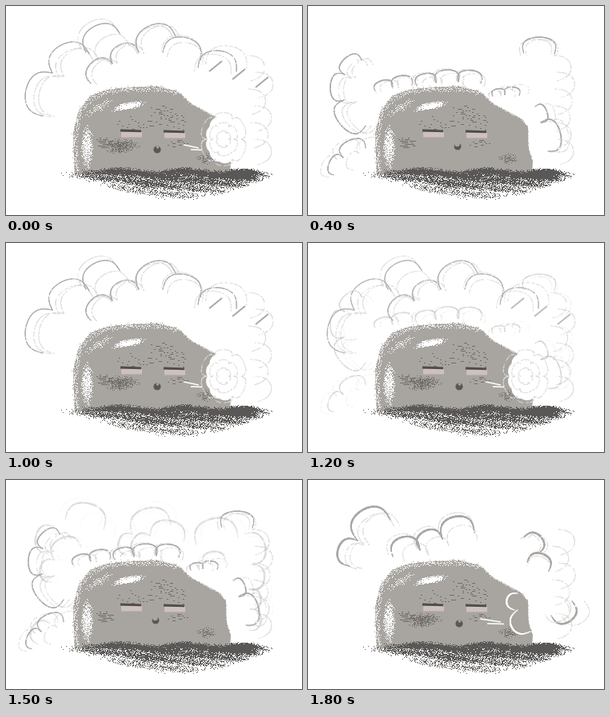
Animation, 370 px wide and 262 px high, one loop 2000 ms. Source, as an HTML page with a canvas:

```html
<!DOCTYPE html>
<html lang="en">
<head>
<meta charset="utf-8">
<title>Puffing rock</title>
<style>
html, body { margin: 0; width: 100%; height: 100%; overflow: hidden; background: #fff; }
canvas { display: block; }
</style>
</head>
<body>
<canvas id="stage" width="370" height="262"></canvas>
<script>
const W = 370, H = 262, LOOP = 1000;
const stage = document.getElementById('stage').getContext('2d');
const ROCK = '#a8a5a0', DARK = '#5a5856', SPECK = '#716e6a', LID = '#4f4c4a', BLUSH = '#cec0bd';
const SMOKE = '#aaa7a4', PALE = '#dcdad8';
const frac = v => v - Math.floor(v);
const clamp = v => Math.max(0, Math.min(1, v));

// Evenly dispersed threshold with a little randomness
function noise(x, y) {
  const even = frac(52.9829 * frac(0.06711 * x + 0.00584 * y));
  const rough = frac(Math.sin(x * 12.9898 + y * 78.233) * 43758.5453);
  return even * 0.45 + rough * 0.55;
}

function pairs(list) {
  return Array.from({ length: list.length / 2 }, (_, i) => [list[2 * i], list[2 * i + 1]]);
}

function grain(c, color, x0, y0, x1, y1, density, size = 1) {
  c.fillStyle = color;
  for (let y = Math.floor(y0); y <= y1; y += size)
    for (let x = Math.floor(x0); x <= x1; x += size)
      if (noise(x, y) < density(x, y)) c.fillRect(x, y, size, 1);
}

function patch(c, color, cx, cy, rx, ry, slope, strength, size) {
  const tall = ry + Math.abs(slope) * rx;
  grain(c, color, cx - rx, cy - tall, cx + rx, cy + tall, (x, y) => {
    const u = (x - cx) / rx, v = (y - cy - slope * (x - cx)) / ry;
    return strength * (1 - u * u - v * v);
  }, size);
}

function line(c, color, width, x0, y0, x1, y1) {
  c.strokeStyle = color;
  c.lineWidth = width;
  c.beginPath();
  c.moveTo(x0, y0);
  c.lineTo(x1, y1);
  c.stroke();
}

function disc(c, color, x, y, r) {
  c.fillStyle = color;
  c.beginPath();
  c.arc(x, y, r, 0, 7);
  c.fill();
}

// Grainy stroke that bulges to the left of the way from a to b;
// a large curl makes it overshoot its ends into little loops
function bump([ax, ay], [bx, by], c, { tall, curl, width }, color, cover = 0.75) {
  const dx = bx - ax, dy = by - ay;
  const steps = Math.ceil(Math.hypot(dx, dy) * (2 + 3 * tall));
  c.fillStyle = color;
  for (let i = 0; i <= steps; i++) {
    const t = i / steps, swell = Math.sin(Math.PI * t);
    const along = t - curl * Math.sin(2 * Math.PI * t);
    const x = ax + dx * along + dy * tall * swell;
    const y = ay + dy * along - dx * tall * swell;
    const w = Math.max(1, width * (0.5 + 0.5 * swell));
    if (noise(Math.round(x), Math.round(y)) < cover) c.fillRect(x - w / 2, y - w / 2, w, w);
  }
}

function bumps(c, points, style, color, cover) {
  for (let i = 1; i < points.length; i++) bump(points[i - 1], points[i], c, style, color, cover);
}

// Cloud outlines, clockwise, as the points where neighbouring bumps meet
const clouds = [
  { at: 0, tall: 0.5, curl: 0.15, width: 1.1, dashes: 3, chains: [
    [46, 138, 58, 84, 104, 60], [100, 58, 143, 36], [106, 97, 133, 72, 166, 58, 212, 38],
    [196, 58, 243, 68], [240, 78, 288, 82]
  ] },
  { at: 400, tall: 0.55, curl: 0.24, width: 1.4, chains: [
    [72, 150, 45, 118, 46, 86, 67, 68], [34, 212, 44, 190, 72, 178],
    [85, 108, 106, 102, 130, 99], [136, 100, 160, 96, 188, 95, 216, 97],
    [231, 113, 246, 111, 264, 112], [270, 60, 308, 60], [284, 126, 291, 146, 300, 182]
  ] },
  { at: 700, tall: 0.55, curl: 0.17, width: 2.3, chains: [
    [52, 92, 60, 58], [74, 50, 122, 62], [56, 128, 60, 100, 94, 84], [40, 206, 55, 180],
    [152, 94, 158, 68, 206, 56], [166, 96, 180, 70, 222, 78], [238, 82, 290, 72],
    [246, 106, 274, 104], [298, 68, 308, 106, 304, 137, 306, 162, 303, 188]
  ] },
  { at: 800, tall: 0.6, curl: 0.18, width: 2.2, chains: [
    [52, 108, 62, 76, 103, 50], [106, 96, 140, 88, 168, 74, 208, 66],
    [270, 72, 288, 92], [274, 104, 301, 114], [330, 152, 304, 170]
  ] }
];

function drawCloud(c, cloud, strength) {
  c.globalAlpha = strength;
  cloud.chains.map(pairs).forEach((points, k) => {
    // Faint echoes drift off from every outline
    for (let e = 1; e <= 2; e++) {
      const grow = 1 + (noise(k, e) - 0.6) * 0.22;
      const echo = points.map(([x, y]) => [185 + (x - 185) * grow + 8 * e - 10, 150 + (y - 150) * grow]);
      bumps(c, echo, { ...cloud, width: 1 }, PALE, 0.55);
    }
    bumps(c, points, cloud, SMOKE);
  });
  for (let i = 0; i < (cloud.dashes || 0); i++) {
    const x = 254 + 29 * i, y = 82 + 10 * i;
    line(c, SMOKE, 2, x, y, x + 16, y - 13);
  }
  // Faint hooks down the right side
  for (let i = 0; i < 6; i++) {
    const x = 302 + 14 * noise(i, cloud.at), y = 62 + 21 * i;
    bump([x, y], [x + 4, y + 32], c, { tall: 0.6, curl: 0.1, width: 1 }, PALE, 0.55);
  }
  c.globalAlpha = 1;
}

const outline = pairs([
  86, 211, 84, 160, 91, 131, 105, 113, 126, 105, 155, 102, 190, 101, 215, 107,
  231, 122, 268, 142, 275, 152, 276, 178, 281, 195, 280, 211
]);

// Light grain inside the edge and a little rock grain outside, softer on the left
function sprayEdge(c) {
  for (let i = 1; i < outline.length - 1; i++) {
    const [ax, ay] = outline[i - 1], [bx, by] = outline[i];
    const len = Math.hypot(bx - ax, by - ay), soft = ax < 215 ? 1 : 0.2;
    for (let k = 0; k < len * 2 * soft; k++) {
      const t = frac(k * 0.618), depth = (noise(k * 7 + i, k * 3) - 0.3) * 9 * soft;
      const x = ax + (bx - ax) * t - (by - ay) / len * depth;
      const y = ay + (by - ay) * t + (bx - ax) / len * depth;
      c.fillStyle = depth > 0 ? '#f4f3f2' : ROCK;
      c.fillRect(Math.round(x), Math.round(y), 1, 1);
    }
  }
}

function drawShadow(c) {
  grain(c, DARK, 58, 200, 345, 245, (x, y) => {
    const u = clamp((x - 60) / 284);
    const top = x < 95 ? 208 : 203 + 2 * Math.sin(x / 13) + Math.max(0, x - 285) * 0.12;
    const bottom = 212 + 31 * Math.pow(Math.sin(Math.PI * Math.pow(u, 1.15)), 1.3);
    if (y < top || y > bottom) return 0;
    const depth = (y - top) / (bottom - top + 1);
    const ends = clamp((x - 58) / 45) * clamp((346 - x) / 35);
    const streak = 0.1 * Math.sin(y * 0.6 - x * 0.07);
    const right = 0.4 * Math.exp(-Math.pow((x - 300) / 26, 2)) * (1 - depth);
    return ends * Math.min(1, 0.25 + (y - top) * 0.16) * (0.98 - 0.75 * depth + streak + right);
  });
}

function makeRock() {
  const canvas = document.createElement('canvas');
  canvas.width = W;
  canvas.height = H;
  const c = canvas.getContext('2d');
  c.fillStyle = ROCK;
  c.beginPath();
  outline.forEach(p => c.lineTo(...p));
  c.fill();
  sprayEdge(c);
  patch(c, '#fff', 153, 125, 24, 6, -0.2, 0.95);
  patch(c, '#fff', 116, 127, 22, 8, -0.5, 0.4);
  patch(c, '#fff', 101, 176, 9, 34, 0, 0.75);
  patch(c, SPECK, 205, 138, 32, 18, 0.2, 0.4, 2);
  patch(c, SPECK, 165, 148, 40, 12, 0, 0.3, 2);
  patch(c, SPECK, 214, 172, 20, 8, 0, 0.5, 2);
  drawShadow(c);
  return canvas;
}
const rock = makeRock();

function drawFace(c, open) {
  for (const [x, y] of [[143, 156], [197, 157]]) {
    c.fillStyle = BLUSH;
    c.fillRect(x + 1, y + 2, 26, 6.5);
    line(c, LID, 2.8, x, y, x + 26, y + 0.8);
  }
  if (open) {
    disc(c, DARK, 189, 180, 4.6);
    disc(c, ROCK, 189.5, 177, 1.8);
  } else {
    disc(c, DARK, 187, 176, 4.5);
    disc(c, ROCK, 186.5, 173, 3.3);
  }
}

function drawSpots(c, blowing) {
  patch(c, SPECK, 122, 171, 15, 12, 0.1, 0.7, 2);
  patch(c, SPECK, 250, 191, 14, 8, 0, 0.6);
  if (blowing) patch(c, SPECK, 142, 175, 28, 11, 0, 0.65);
}

function ring(x, y, rx, ry, n) {
  return Array.from({ length: n + 1 }, (_, i) => {
    const a = i / n * 2 * Math.PI;
    return [x + rx * Math.cos(a), y + ry * Math.sin(a)];
  });
}

function drawPuff(c) {
  ring(272, 167, 10, 18, 9).forEach(([x, y]) => disc(c, '#fff', x, y, 12.5));
  disc(c, '#fff', 272, 167, 15);
  for (const size of [0.5, 1, 1.6])
    bumps(c, ring(272, 167, 13 * size, 18 * size, 6), { tall: 0.4, curl: 0.2, width: 1 }, PALE, 0.55);
}

function drawBreath(c, x) {
  line(c, '#fff', 1.3, x, 174, 241, 178);
  line(c, '#fff', 1.3, x + 9, 180, 245, 180.5);
}

// Strength of each cloud: full at its own time, crossfading up to the next
function strengthAt(i, t) {
  const last = clouds.filter(k => k.at <= t).length - 1;
  if (last === clouds.length - 1) return i === last ? 1 : 0;
  const u = (t - clouds[last].at) / (clouds[last + 1].at - clouds[last].at);
  return i === last ? 1 - u * u : i === last + 1 ? u * u : 0;
}

function draw(t) {
  const c = stage, puffing = t < 300, open = puffing || t >= 600;
  c.fillStyle = '#fff';
  c.fillRect(0, 0, W, H);
  clouds.forEach((cloud, i) => {
    const strength = strengthAt(i, t);
    if (strength) drawCloud(c, cloud, strength);
  });
  c.drawImage(rock, 0, 0);
  drawSpots(c, open);
  drawFace(c, open);
  if (puffing) drawPuff(c);
  if (t === 800) {
    const rim = pairs([258, 163, 262, 142]), lower = pairs([278, 190, 262, 163]);
    const style = { tall: 0.55, curl: 0.12, width: 1.8 };
    bumps(c, rim, style, '#fff', 1);
    bumps(c, lower, style, '#fff', 1);
  }
  if (open) drawBreath(c, puffing ? 222 : t < 800 ? 209 : 215);
}

// Redrawn every tenth of a second; the first and last drawings hold for two
const start = performance.now();
let shown = -1;
function tick() {
  const time = Math.max(0, performance.now() - start) % LOOP;
  let t = Math.floor(time / 100) * 100;
  if (t === 100 || t === 900) t -= 100;
  if (t !== shown) draw(shown = t);
  requestAnimationFrame(tick);
}
tick();
</script>
</body>
</html>
```
